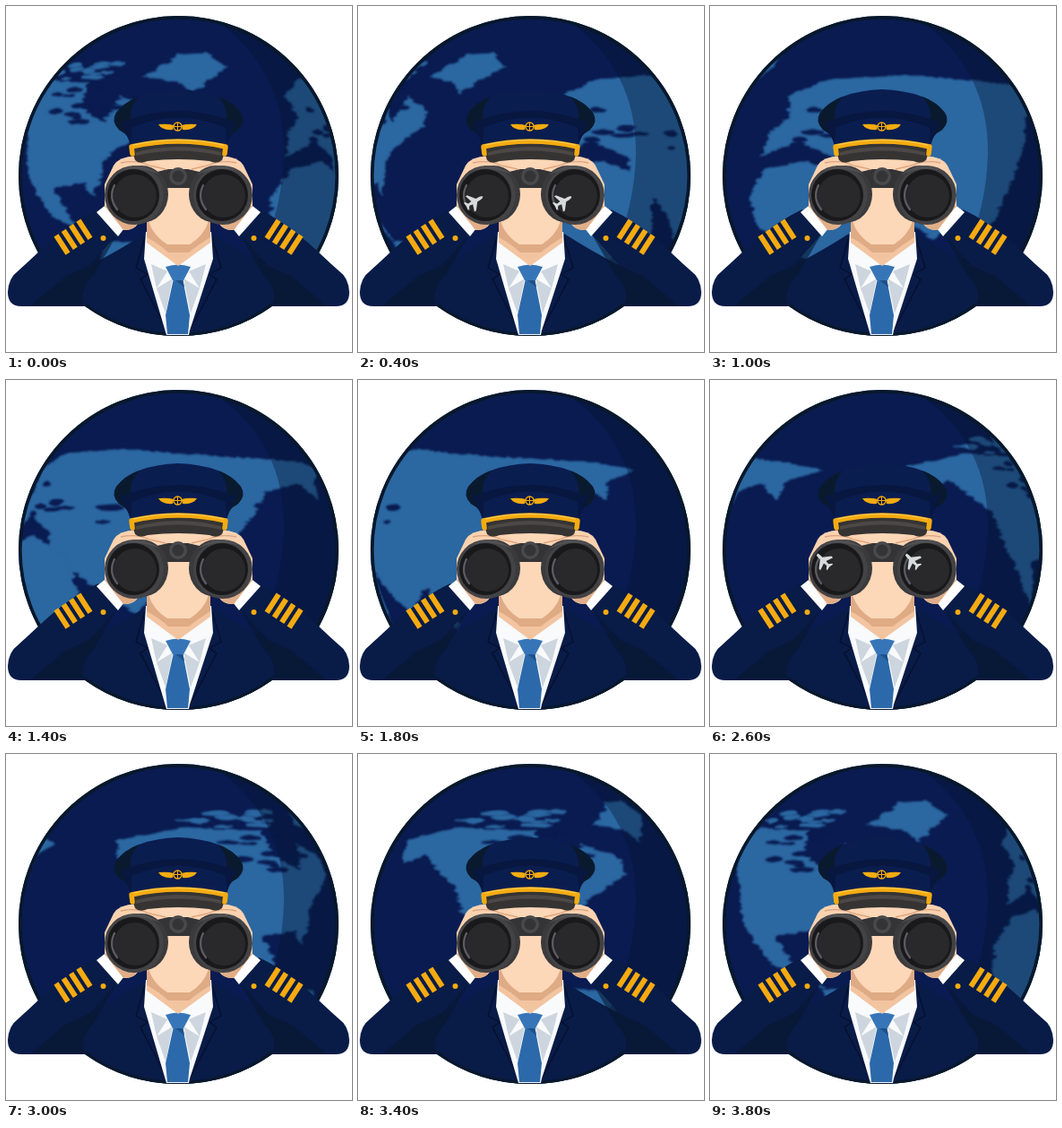
An HTML page with a canvas that plays this animation: 386 px wide and 386 px high, repeating every 3.9 s.

```html
<!DOCTYPE html>
<html lang="en">
<head>
<meta charset="utf-8">
<title>Pilot and globe</title>
<style>
html, body { margin: 0; width: 100%; height: 100%; overflow: hidden; background: #fff; }
canvas, svg { position: absolute; left: 0; top: 0; width: 386px; height: 386px; }
.mirror { transform: matrix(-1, 0, 0, 1, 385, 0); }
</style>
</head>
<body>
<canvas id="globe" width="386" height="386"></canvas>
<svg viewBox="0 0 386 386">
  <defs>
    <clipPath id="lens"><circle cx="142" cy="211" r="28"/></clipPath>

    <g id="side">
      <path fill="#091b47" d="M2 319Q3 303 13 296C38 274 64 245 103 227L125 254L94 289Q122 275 155 254L193 330V368A178.500 178.500 0 0 1 88 335H17Q2 335 2 319Z"/>
      <path fill="#07182f" d="M124 255L94 289L66 302L28 334H88Q80 318 98 300Z" opacity=".6"/>
      <path fill="none" stroke="#050f2a" stroke-width="1.2" d="M155 258L145 292L158 299L150 305L182 366"/>
      <path fill="none" stroke="#07182b" stroke-width="3" d="M88 333A177 177 0 0 0 193 366.500"/>
      <g fill="#f5ab10">
        <rect id="bar" x="-3" y="-12" width="6" height="24" transform="translate(62.500 266) rotate(-33)"/>
        <use href="#bar" x="8.3" y="-5.6"/>
        <use href="#bar" x="16.6" y="-11.2"/>
        <use href="#bar" x="24.9" y="-16.8"/>
        <circle cx="108.500" cy="259" r="3"/>
      </g>
      <path fill="#fff" d="M101 230L110 223L132 248L125 257Z"/>
      <path fill="#fbd2b0" d="M110 223V199L120 178Q126 168 142 168H155V200L148 242Q142 251 131 250Z"/>
      <path fill="#e2ae88" d="M111 224L116 218L148 241Q142 251 131 250Z"/>
    </g>

    <g id="barrel">
      <ellipse cx="151" cy="210" rx="30" ry="32" fill="#3a3a3c"/>
      <circle cx="143" cy="211" r="33" fill="#434346"/>
      <path fill="#505053" d="M126 184Q150 171 171 188Q150 178 126 184Z"/>
    </g>
    <g id="glass">
      <circle cx="142" cy="211" r="29" fill="#19191b"/>
      <circle cx="144" cy="212" r="24" fill="#29292b"/>
      <path fill="none" stroke="#5c5c60" stroke-width="2.4" stroke-linecap="round" d="M121 200Q114 214 124 227"/>
      <g clip-path="url(#lens)">
        <path class="plane" fill="#d9dadb" d="M0 -12Q2 -11 2 -7V-3L11 4V6.500L2 3.500L1.500 8L5 11V12.500L0 11.500L-5 12.500V11L-1.500 8L-2 3.500L-11 6.500V4L-2 -3V-7Q-2 -11 0 -12Z"/>
      </g>
    </g>
    <path id="wing" fill="#f5ab10" d="M187 133Q181 131 170 132Q174 139 186 138Z"/>
    <path id="shade" fill="#0a1a2e" d="M138 153Q139 145 126 138Q117 129 123 119Q132 107 148 101Q132 120 144 139Z"/>
  </defs>

  <use href="#side"/>
  <use href="#side" class="mirror"/>

  <path fill="#f8fafc" d="M156 252H229L231 282L205 362L204 367H179L176 357L154 282Z"/>
  <path fill="#cdd5de" d="M162 288L180 296L168 315ZM223 288L204 296L216 315ZM186 304L178 343L168 315ZM198 304L206 343L216 315Z"/>
  <path fill="#2c69aa" d="M187 304H197L205 345L203 366H180L178 345Z"/>
  <path fill="#1e5089" d="M187 304H197L199 314Z"/>
  <path fill="#3676b8" d="M178 291Q192 286 206 291L198 306H186Z"/>

  <path fill="#f3c4a0" d="M157 232H228V264L192 290L157 264Z"/>
  <path fill="#dfab85" d="M157 236L228 236V258Q212 268 204 275H181Q172 266 157 258Z"/>
  <path fill="#fcd7b8" d="M145 166H240V222L226 240Q221 256 205 266H180Q164 256 159 240L145 222Z"/>

  <path fill="#fbd2b0" d="M119 183Q128 165 150 168L172 177L165 190H120ZM266 183Q257 165 235 168L213 177L220 190H265Z"/>
  <path fill="none" stroke="#dba47e" stroke-width="1.3" d="M128 175Q146 171 160 178L178 182M257 175Q239 171 225 178L207 182"/>

  <path fill="#0a1d4f" d="M138 154Q139 145 126 138Q117 129 123 119Q142 95 192 93Q243 95 262 119Q268 129 259 138Q246 145 247 154Z"/>
  <use href="#shade"/>
  <use href="#shade" class="mirror"/>
  <path fill="#071740" d="M128 130Q192 104 257 130L246 154H139Z"/>
  <path fill="#0a1d4f" d="M140 136Q192 113 245 136L246 154H139Z"/>
  <path fill="#353433" d="M139 157Q192 143 246 157L241 172Q235 177 227 173Q192 169 158 173Q149 177 144 172Z"/>
  <path fill="#4b4846" d="M145 163Q192 151 240 163V167Q192 156 145 167Z"/>
  <path fill="none" stroke="#f5ab10" stroke-width="5.500" stroke-linecap="round" stroke-linejoin="round" d="M141 165L140 157Q192 145 245 157L244 165"/>
  <path fill="none" stroke="#ffd05c" stroke-width="1.2" d="M142 155Q192 144 243 155"/>
  <use href="#wing"/>
  <use href="#wing" transform="matrix(-1 0 0 1 383 0)"/>
  <circle cx="191.500" cy="134.500" r="4.500" fill="#0a1738" stroke="#f5ab10" stroke-width="1.4"/>
  <path stroke="#f5ab10" d="M187 134.500H196M191.500 130V139"/>

  <path fill="#343436" d="M164 186L181 182H203L220 186V203H164Z"/>
  <use href="#barrel"/>
  <use href="#barrel" class="mirror"/>
  <circle cx="192" cy="190" r="10" fill="#49494c"/>
  <circle cx="192" cy="190" r="6.500" fill="#343436"/>
  <use href="#glass"/>
  <use href="#glass" x="99"/>
</svg>

<script>
const ctx = document.getElementById('globe').getContext('2d');
const plane = document.querySelector('.plane');
const CX = 192.5, CY = 189.5, R = 178.5, STEP = 100, STEPS = 39;
const OCEAN = '#091b50', LAND = '#2b67a1';

let seed = 11;
const rand = (lo, hi) => lo + (hi - lo) * ((seed = seed * 16807 % 2147483647) / 2147483647);

// Corners "angle,height"; the coast between them is roughened by rule.
function coast(corners) {
  const pts = corners.split(' ').map(p => p.split(',').map(Number));
  return pts.flatMap(([a, y], i) => {
    const [b, z] = pts[(i + 1) % pts.length];
    const parts = Math.ceil(Math.hypot(b - a, z - y) / 2);
    return Array.from({ length: parts }, (_, k) => {
      const f = k / parts;
      return [a + (b - a) * f + rand(-1.6, 1.6), y + (z - y) * f + rand(-1, 1)];
    });
  });
}

// Flat streaks scattered over a range of angles and heights.
function streaks(count, a0, a1, y0, y1, size) {
  return Array.from({ length: count }, () => {
    const a = rand(a0, a1), y = rand(y0, y1), w = size * rand(.5, 1.3), h = rand(1.5, 3.5);
    return Array.from({ length: 12 }, (_, k) =>
      [a + w * Math.cos(k * Math.PI / 6), y + h * Math.sin(k * Math.PI / 6) + rand(-.8, .8)]);
  });
}

const land = [
  coast('43,168 46,140 53,122 50,100 66,82 104,77 135,83 196,92 215,101 199,112 196,134 184,115 165,125 151,172 140,226 135,280 124,232 112,260 88,215 84,248 72,205 76,172 60,150'),
  coast('44,182 64,172 84,196 92,256 80,300 54,280 37,245 36,212'),
  coast('-110,96 -80,82 -44,86 -42,112 -30,130 -24,100 -9,116 -7,132 -26,165 -32,212 -37,197 -52,204 -44,236 -32,262 -54,236 -70,190 -75,150 -92,112 -106,124'),
  coast('-34,262 -14,264 0,305 -34,305'),
  coast('-16,79 0,54 16,52 24,68 16,80 5,98 1,85'),
  ...streaks(14, -80, -25, 64, 82, 7)
];
const water = [
  ...streaks(12, -75, -15, 86, 130, 5),
  ...streaks(10, 50, 105, 115, 165, 5)
];

function fill(shapes, turn, color) {
  ctx.fillStyle = color;
  for (const shape of shapes) for (const wrap of [-360, 0, 360]) {
    ctx.beginPath();
    for (const [a, y] of shape) {
      const angle = Math.max(-90, Math.min(90, a + wrap - turn)) * Math.PI / 180;
      const half = Math.sqrt(Math.max(0, R * R - (y - CY) ** 2));
      ctx.lineTo(CX + half * Math.sin(angle), y);
    }
    ctx.fill();
  }
}

function drawGlobe(turn) {
  ctx.clearRect(0, 0, 386, 386);
  ctx.save();
  ctx.beginPath();
  ctx.arc(CX, CY, R, 0, 7);
  ctx.clip();
  ctx.fillStyle = OCEAN;
  ctx.fillRect(0, 0, 386, 386);
  ctx.filter = 'blur(1px)';
  fill(land, turn, LAND);
  fill(water, turn, OCEAN);
  ctx.filter = 'none';
  ctx.fillStyle = 'rgba(4,20,48,.36)';
  ctx.beginPath();
  ctx.moveTo(222, 8);
  ctx.bezierCurveTo(290, 50, 311, 108, 310, 165);
  ctx.bezierCurveTo(308, 250, 270, 330, 200, 375);
  ctx.lineTo(386, 386);
  ctx.lineTo(386, 0);
  ctx.fill();
  ctx.restore();
  ctx.strokeStyle = '#07182b';
  ctx.lineWidth = 3.6;
  ctx.beginPath();
  ctx.arc(CX, CY, R - 1.8, 0, 7);
  ctx.stroke();
}

// Two flights per loop: up to the right, then up to the left.
function placePlane(step) {
  const east = step < 13;
  const d = (step - (east ? 4 : 26)) * 9;
  const x = east ? 130 + d : 126 - d;
  const y = east ? 218 - d * .55 : 201 - d;
  plane.setAttribute('transform', `translate(${x} ${y}) rotate(${east ? 60 : -45}) scale(.9)`);
}

let last = -1;
function tick(now) {
  const step = Math.floor(now / STEP) % STEPS;
  if (step !== last) {
    last = step;
    drawGlobe(step * 360 / STEPS);
    placePlane(step);
  }
  requestAnimationFrame(tick);
}
tick(0);
</script>
</body>
</html>
```
